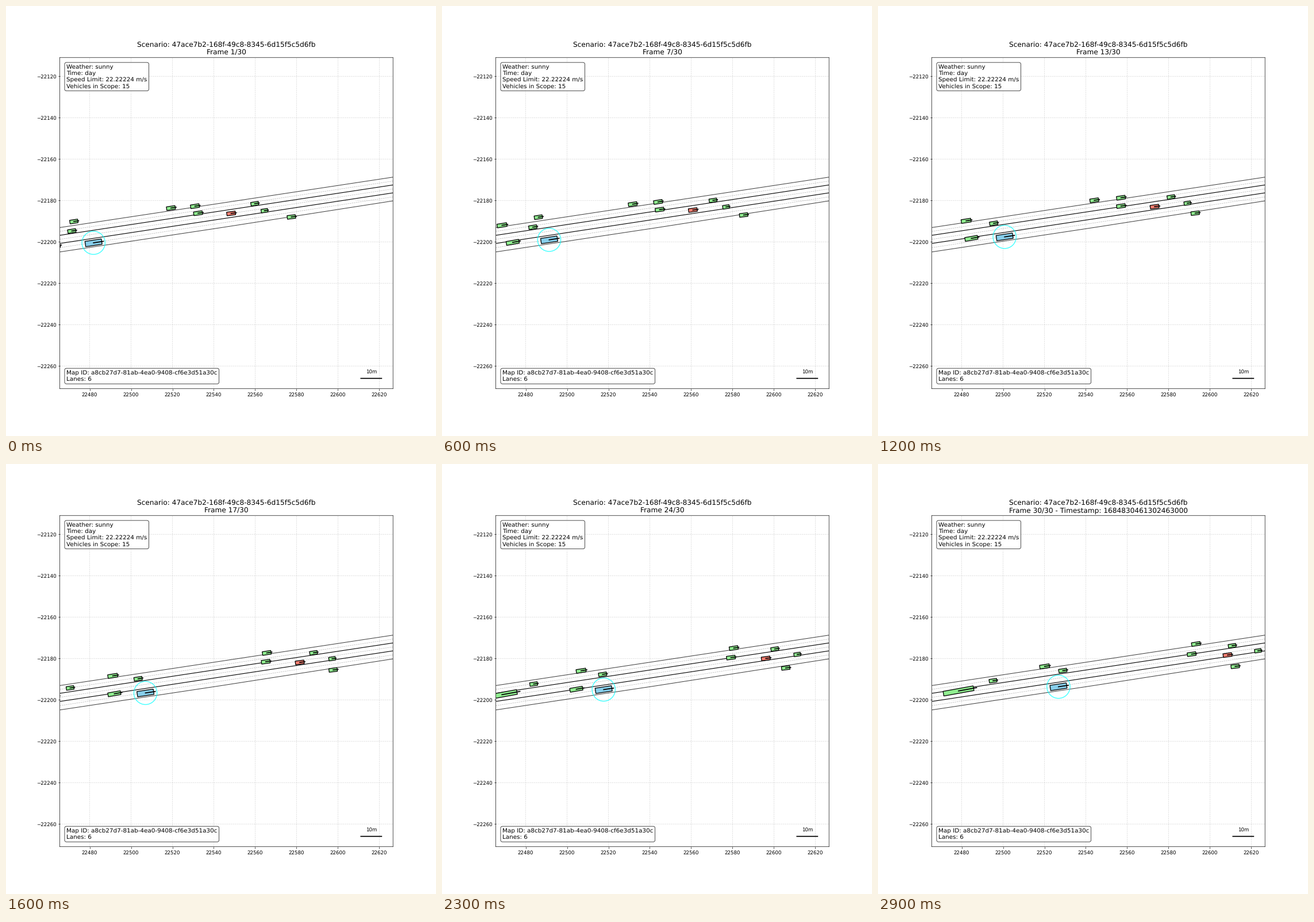
These frames come from a looping animation (748x748 px, 3 s). A matplotlib script:

```python
import math

import matplotlib.pyplot as plt
import numpy as np
from matplotlib.animation import FuncAnimation
from matplotlib.patches import Circle, Polygon

plt.rcParams.update({"font.family": "DejaVu Sans", "path.snap": False,
                     "text.hinting": "no_hinting"})

SIZE, FRAMES, FPS = 748, 30, 10
SCENARIO = "47ace7b2-168f-49c8-8345-6d15f5c5d6fb"
TIMESTAMP = "1684830461302463000"
CENTER = np.array([22546.07, -22190.97])
HALF = 80
HALF_X = HALF * 0.775 / 0.77
CORNERS = np.array([(-0.5, -0.5), (0.5, -0.5), (0.5, 0.5), (-0.5, 0.5)])

fig = plt.figure(figsize=(12, 12), dpi=SIZE / 12, facecolor="white")
ax = fig.add_axes([0.125, 0.11, 0.775, 0.77])
ax.set_xlim(CENTER[0] - HALF_X, CENTER[0] + HALF_X)
ax.set_ylim(CENTER[1] - HALF, CENTER[1] + HALF)
ax.set_xticks(range(22480, 22621, 20))
ax.set_yticks(range(-22260, -22119, 20))
ax.grid(True, linestyle="--", alpha=0.5)


def draw_road():
    """Seven lines: outer edges, lane borders and dashed centre lines."""
    edge = dict(color="black", alpha=0.75, lw=1.2)
    border = dict(color="black", lw=1.3)
    middle = dict(color="gray", alpha=0.6, lw=0.8, ls="--")
    for i in range(7):
        points = [(-HALF_X, -2.13 - 1.833 * i - 0.022 * i * i),
                  (HALF_X, 22.23 - 1.875 * i - 0.006 * i * i)]
        if i == 6:
            points.insert(1, (-2.3, -2.13))  # the lower edge bends slightly
        style = edge if i in (0, 6) else middle if i % 2 else border
        ax.plot(*(CENTER + points).T, **style)


def draw_labels():
    style = dict(transform=ax.transAxes, fontsize=12, zorder=10,
                 bbox=dict(boxstyle="round", facecolor="white", alpha=0.8))
    ax.text(0.02, 0.98,
            "Weather: sunny\nTime: day\nSpeed Limit: 22.22224 m/s\n"
            "Vehicles in Scope: 15", va="top", **style)
    ax.text(0.02, 0.02,
            "Map ID: a8cb27d7-81ab-4ea0-9408-cf6e3d51a30c\nLanes: 6",
            va="bottom", **style)
    end, base = CENTER + (HALF - 5, -HALF)
    ax.plot([end - 10, end], [base + 5] * 2, color="black", lw=2)
    ax.text(end - 5, base + 7, "10m", ha="center", va="bottom", fontsize=10)


class Vehicle:
    """A box that drives along its heading and brakes gently.

    Start in metres from the map centre, speed in m/s, heading in degrees.
    """

    def __init__(self, x, y, speed, length, heading=8.6, braking=0.3,
                 width=None, color="lightgreen", until=FRAMES):
        self.start = CENTER + (x, y)
        self.speed, self.braking, self.until = speed, braking, until
        angle = math.radians(heading)
        self.ahead = np.array([math.cos(angle), math.sin(angle)])
        side = np.array([-self.ahead[1], self.ahead[0]])
        size = (length, width or 1.55 + 0.05 * length)
        self.shape = CORNERS * size @ np.array([self.ahead, side])
        self.reach = 0.6 * length * self.ahead
        self.body = ax.add_patch(Polygon(self.shape, facecolor=color,
                                         edgecolor="black", lw=1.5, zorder=4))
        self.nose, = ax.plot([], [], color="black", lw=2, zorder=5)

    def update(self, frame):
        t = frame / FPS
        travel = self.speed * t - self.braking * t * t / 2
        pos = self.start + travel * self.ahead
        self.body.set_xy(self.shape + pos)
        self.nose.set_data(*np.array([pos, pos + self.reach]).T)
        for part in (self.body, self.nose):
            part.set_visible(frame < self.until)
        return pos


draw_road()
draw_labels()

ego = Vehicle(-64.2, -9.5, 16.1, 8, width=2.6, color="skyblue")
traffic = [
    Vehicle(-73.7, 0.8, 24.4, 3.9, braking=4, until=10),
    Vehicle(-74.7, -3.8, 20.5, 3.9, heading=8.8),
    Vehicle(-26.8, 7.3, 21.1, 4.2, until=16),
    Vehicle(-15.2, 8.2, 22.2, 4.2, heading=8.9),
    Vehicle(-13.7, 4.8, 20.9, 4.2, heading=8),
    Vehicle(2.3, 4.7, 20.9, 4.2, heading=7.5, braking=0, color="salmon"),
    Vehicle(13.7, 9.4, 18.2, 3.7),
    Vehicle(18.4, 6.0, 20.9, 3.2, heading=8.4),
    Vehicle(31.4, 3.0, 13.5, 4, heading=6.8, braking=1),
    Vehicle(-83.4, -11.2, 18.8, 6.2, heading=9.9, until=26),
    Vehicle(-91.2, -3.2, 23.2, 4.7, heading=9),
    Vehicle(-106.5, -7.7, 19.8, 3.7, heading=8.1),
    Vehicle(-115.8, -13.5, 16.9, 14.8, heading=10.3, braking=0),
]
halo = ax.add_patch(Circle(CENTER, 5.6, fill=False, edgecolor="cyan", lw=1.6,
                           alpha=0.75, zorder=6))
title = ax.set_title("", fontsize=14)


def update(frame):
    suffix = f" - Timestamp: {TIMESTAMP}" if frame == FRAMES - 1 else ""
    title.set_text(f"Scenario: {SCENARIO}\nFrame {frame + 1}/{FRAMES}{suffix}")
    halo.center = ego.update(frame)
    for vehicle in traffic:
        vehicle.update(frame)
    return []


anim = FuncAnimation(fig, update, frames=FRAMES, interval=1000 // FPS,
                     init_func=lambda: update(0), repeat=True, repeat_delay=0)
plt.show()
```
